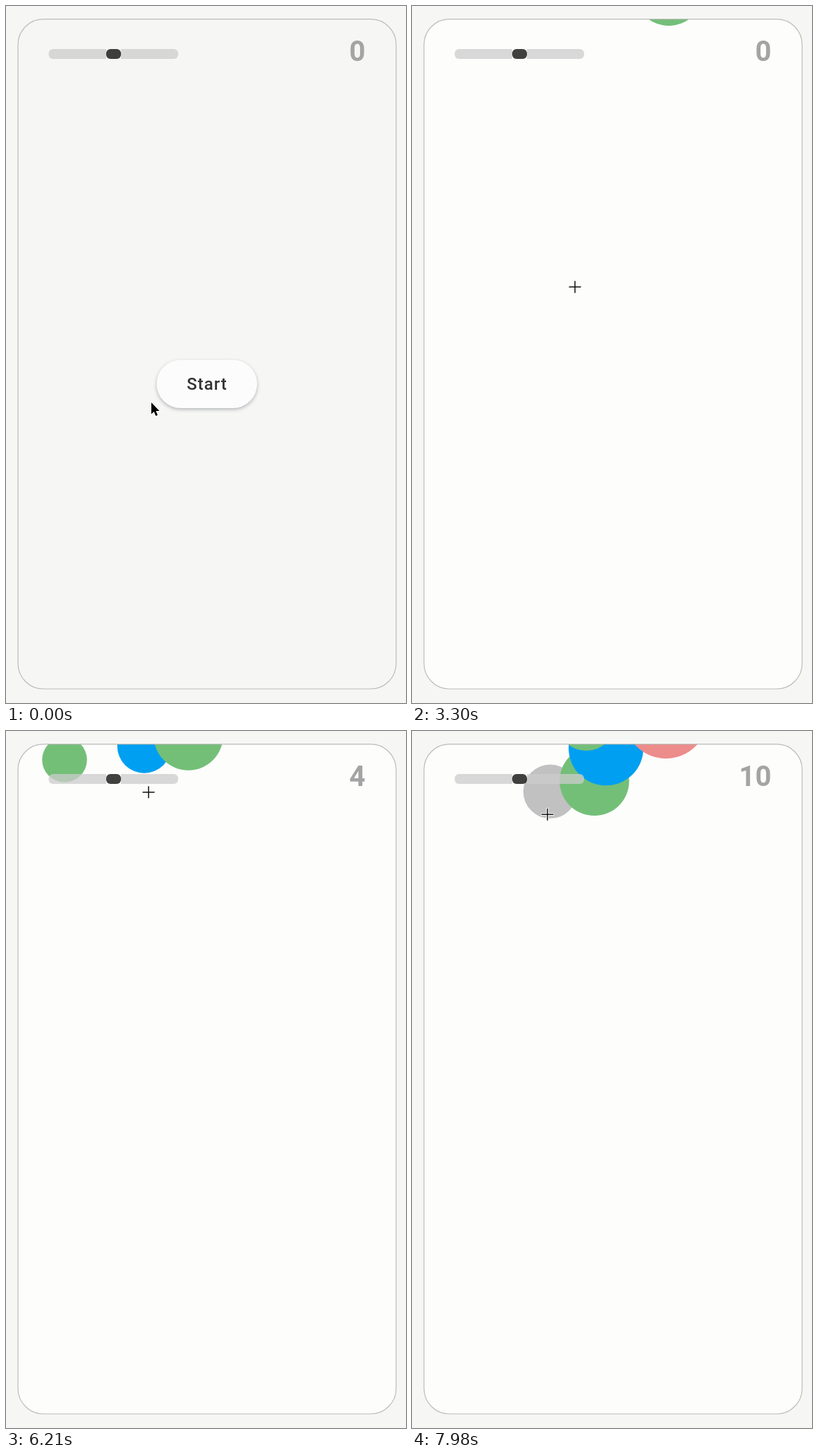
An HTML page with a canvas for the animation above (8000 ms loop, 567 px wide and 988 px high).

```html
<!DOCTYPE html>
<html lang="en">
<head>
<meta charset="utf-8">
<title>Dot game</title>
<style>
  html, body { margin: 0; width: 100%; height: 100%; overflow: hidden; background: #f6f7f4; }
  canvas { display: block; width: 567px; height: 988px; }
</style>
</head>
<body>
<canvas id="stage"></canvas>
<script>
const W = 567, H = 988, LOOP = 8000;
const canvas = document.getElementById('stage');
const ctx = canvas.getContext('2d');
const ratio = window.devicePixelRatio || 1;
canvas.width = W * ratio;
canvas.height = H * ratio;

const GREEN = '#73bf78', BLUE = '#009ff1', CORAL = '#ec8c8b', GREY = '#c1c1c1';
const SPEED = 0.0364, START_CLICK = 1000, SHRINK = 300;

// y is the dot's bottom edge at time t; all dots fall at one speed.
const dots = [
  { x: 364, r: 48.5, color: GREEN, t: 3300, y: 28, click: 5370, points: 4 },
  { x: 83, r: 31.8, color: GREEN, t: 6990, y: 101, click: 7080, points: 6 },
  { x: 196, r: 38.3, color: BLUE, t: 6990, y: 88 },
  { x: 258.5, r: 49.3, color: GREEN, t: 6990, y: 84 },
  { x: 275, r: 53, color: BLUE, t: 6990, y: 41.3 },
  { x: 247, r: 41, color: GREEN, t: 7980, y: 28 },
  { x: 360, r: 59, color: CORAL, t: 7980, y: 39 }
];

// time, x, y
const pointerPath = [
  [0, 206, 562], [700, 258, 545], [1050, 258, 545], [1550, 231, 398],
  [3950, 231, 398], [4590, 344, 160], [5150, 362, 76], [5650, 362, 76],
  [6700, 72, 95], [7250, 72, 95], [7800, 192, 118], [LOOP, 192, 118]
];

const clamp = v => Math.max(0, Math.min(1, v));
const ease = v => v * v * (3 - 2 * v);

function pointerAt(t) {
  const i = pointerPath.findIndex(step => step[0] > t);
  const [t0, x0, y0] = pointerPath[i - 1], [t1, x1, y1] = pointerPath[i];
  const k = ease((t - t0) / (t1 - t0));
  return { x: x0 + (x1 - x0) * k, y: y0 + (y1 - y0) * k };
}

function pill(x, y, w, h, r, fill) {
  ctx.beginPath();
  ctx.roundRect(x, y, w, h, r);
  if (fill) {
    ctx.fillStyle = fill;
    ctx.fill();
  }
}

function label(text, x, y, font, color, align) {
  ctx.font = font;
  ctx.fillStyle = color;
  ctx.textAlign = align;
  ctx.fillText(text, x, y);
}

function drawDots(t, pointer) {
  const centerY = d => d.y + (t - d.t) * SPEED - d.r;
  const live = dots.filter(d => !(t >= d.click + SHRINK));
  const hovered = live.filter(d =>
    Math.hypot(pointer.x - d.x, pointer.y - centerY(d)) < d.r).pop();
  for (const d of live) {
    // A clicked dot collapses towards its top left corner.
    const clicked = t >= d.click;
    const sx = clicked ? 1 - (t - d.click) / SHRINK : 1;
    const rx = d.r * sx, ry = d.r * sx ** 1.4;
    ctx.beginPath();
    ctx.ellipse(d.x - d.r + rx, centerY(d) - d.r + ry, rx, ry, 0, 0, Math.PI * 2);
    ctx.fillStyle = clicked || d === hovered ? GREY : d.color;
    ctx.fill();
  }
}

function drawSlider() {
  ctx.globalAlpha = 0.75;
  pill(60.5, 61, 81.5, 14, [6, 0, 0, 6], '#cccccc');
  pill(163, 61, 81, 14, [0, 6, 6, 0], '#cccccc');
  pill(142, 61, 21, 14, 6, '#000');
  ctx.globalAlpha = 1;
}

function drawStart(alpha) {
  ctx.save();
  ctx.globalAlpha = alpha;
  ctx.shadowColor = 'rgba(40,40,60,.32)';
  ctx.shadowBlur = 5 * ratio;
  ctx.shadowOffsetY = 2 * ratio;
  pill(213.5, 501.5, 142.5, 68.5, 34.2, '#fcfcfc');
  ctx.shadowColor = 'transparent';
  ctx.letterSpacing = '1px';
  label('Start', 285, 544, '500 24px Roboto, sans-serif', '#333', 'center');
  ctx.restore();
}

function drawArrow({ x, y }) {
  const shape = [[0, 0], [0, 16.5], [3.7, 13], [6.3, 19], [9, 18], [6.5, 12], [11.5, 12]];
  ctx.beginPath();
  shape.forEach(([dx, dy]) => ctx.lineTo(x + dx, y + dy));
  ctx.closePath();
  ctx.lineJoin = 'round';
  ctx.lineWidth = 2.4;
  ctx.strokeStyle = '#fff';
  ctx.stroke();
  ctx.fillStyle = '#000';
  ctx.fill();
}

function drawCross({ x, y }) {
  for (const [color, width, reach] of [['#fff', 3.4, 9.2], ['#111', 1.5, 8.5]]) {
    ctx.beginPath();
    ctx.moveTo(x - reach, y + 0.3);
    ctx.lineTo(x + reach, y + 0.3);
    ctx.moveTo(x, y + 0.3 - reach);
    ctx.lineTo(x, y + 0.3 + reach);
    ctx.strokeStyle = color;
    ctx.lineWidth = width;
    ctx.stroke();
  }
}

function draw(t) {
  const pointer = pointerAt(t);
  const intro = 1 - clamp((t - START_CLICK) / 200);
  const score = dots.reduce((sum, d) => sum + (t >= d.click ? d.points : 0), 0);

  ctx.setTransform(ratio, 0, 0, ratio, 0, 0);
  ctx.fillStyle = '#f6f7f4';
  ctx.fillRect(0, 0, W, H);

  ctx.save();
  pill(17, 18.7, 536, 949.3, 36, '#fdfdfc');
  ctx.clip();
  drawDots(t, pointer);
  ctx.globalAlpha = intro;
  ctx.fillStyle = '#f6f7f4';
  ctx.fillRect(0, 0, W, H);
  ctx.restore();

  drawSlider();
  label(score, 509.5, 78, '700 40px Roboto, sans-serif', '#a4a4a4', 'right');
  pill(17, 18.7, 536, 949.3, 36);
  ctx.strokeStyle = '#bcbcb9';
  ctx.lineWidth = 1.2;
  ctx.stroke();

  if (intro > 0) drawStart(intro);
  (t < START_CLICK + 200 ? drawArrow : drawCross)(pointer);
}

const begin = performance.now();
function tick() {
  draw((performance.now() - begin) % LOOP);
  requestAnimationFrame(tick);
}
tick();
</script>
</body>
</html>
```
